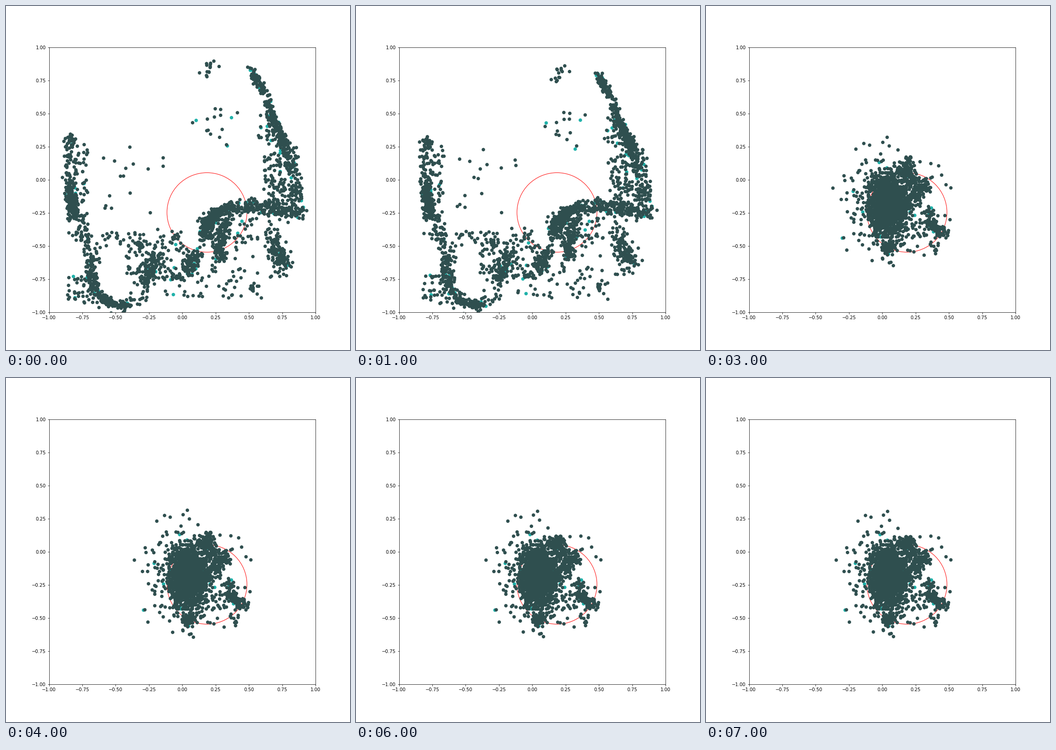
A matplotlib script that plays this animation: 748x748 px, repeating every 8 s.

```python
import numpy as np
import matplotlib.pyplot as plt
from matplotlib.animation import FuncAnimation

FRAMES, INTERVAL, DPI, SIZE = 8, 1000, 72, 748
DARK, TEAL, TEAL_SHARE = "darkslategray", "lightseagreen", .04
rng = np.random.default_rng(11)


def noise(n, spread):
    return spread * np.clip(rng.normal(size=(n, 2)), -2.2, 2.2)


def path(n, spread, *keys):
    """Points strewn along a polyline, evenly shared among its segments."""
    xs, ys = zip(*keys)
    t = rng.uniform(0, len(keys) - 1, n)
    steps = range(len(keys))
    line = np.column_stack([np.interp(t, steps, xs), np.interp(t, steps, ys)])
    return line + noise(n, spread)


def ring(n, spread, center, radii, start, end):
    """Points strewn along an elliptic arc, angles in degrees."""
    a = np.radians(rng.uniform(start, end, n))
    return center + radii * np.column_stack([np.cos(a), np.sin(a)]) \
        + noise(n, spread)


def blob(n, x, y, sx, sy):
    return (x, y) + noise(n, 1) * (sx, sy)


def box(n, x0, x1, y0, y1):
    return rng.uniform((x0, y0), (x1, y1), (n, 2))


def mix(*parts):
    pts = np.vstack(parts)
    rng.shuffle(pts)
    return pts


def wide_cloud():
    left = [
        blob(22, -.84, .31, .025, .025),
        path(35, .022, (-.86, .25), (-.85, 0)),
        path(190, .02, (-.845, -.02), (-.83, -.17), (-.81, -.28)),
        path(60, .025, (-.79, -.25), (-.73, -.4), (-.69, -.6)),
        box(45, -.85, -.7, -.2, .28),
        box(12, -.86, -.7, -.5, -.33),
        box(35, -.86, -.66, -.93, -.72),
    ]
    loop_center, loop_radii = (-.47, -.69), (.215, .26)
    loop = [
        ring(110, .03, loop_center, loop_radii, 0, 360),
        ring(95, .024, loop_center, loop_radii, 155, 215),
        ring(80, .014, loop_center, loop_radii, 215, 290),
        path(110, .035, (-.3, -.76), (-.22, -.67), (-.18, -.55)),
        box(45, -.42, -.2, -.75, -.4),
        box(75, -.2, .06, -.76, -.37),
        path(90, .024, (.03, -.7), (.12, -.54)),
    ]
    arch = [
        path(190, .026, (.16, -.43), (.18, -.32), (.25, -.26)),
        path(110, .017, (.22, -.28), (.29, -.23), (.38, -.19)),
        path(190, .032, (.4, -.2), (.55, -.21), (.7, -.22), (.88, -.25)),
        path(150, .025, (.34, -.24), (.28, -.48), (.28, -.61)),
        box(30, .2, .36, -.45, -.25),
    ]
    right = [
        path(120, .015, (.51, .86), (.57, .73), (.65, .6), (.66, .48)),
        path(150, .015, (.67, .47), (.72, .35), (.77, .27)),
        path(140, .028, (.78, .25), (.83, .12), (.86, -.1), (.88, -.31)),
        box(110, .61, .84, -.2, .2),
        box(30, .63, .74, .15, .45),
        path(100, .03, (.66, -.42), (.71, -.55), (.78, -.66)),
        box(35, .62, .82, -.75, -.3),
    ]
    sparse = [
        blob(14, .21, .82, .04, .035),
        box(16, .05, .45, .25, .55),
        box(16, -.6, -.1, -.25, .25),
        box(6, .5, .6, .3, .6),
        box(55, -.15, .6, -.9, -.65),
        box(30, .35, .57, -.6, -.25),
        blob(12, .53, -.82, .025, .012),
    ]
    return mix(*left, *loop, *arch, *right, *sparse)


def core_cloud():
    return mix(
        blob(1300, .035, -.19, .066, .11),
        blob(420, .03, -.17, .115, .145),
        path(170, .03, (.1, -.22), (.2, -.17), (.28, -.1), (.33, -.02)),
        path(160, .032, (.21, .17), (.15, .08), (.2, .03), (.29, -.05)),
        path(110, .02, (.34, -.22), (.36, -.33), (.42, -.39), (.48, -.41)),
        blob(80, .05, -.51, .026, .03),
        box(50, .1, .42, -.57, -.25),
        ring(34, .05, (.05, -.17), (.34, .42), 65, 285),
        ring(9, .03, (.05, -.17), (.45, .45), -65, 45),
    )


def shrink(p):
    """First small contraction of the wide cloud."""
    x, y = p.T
    pull = np.where(x > .2, .07 * np.clip((.98 - x) * 3, 0, 1), .045)
    dy = -.035 * (y + .2) * np.clip((y + 1) * 3, 0, 1)
    return p + np.column_stack([pull * (.2 - x), dy]) + jitter


def settle(p, u):
    """Ease the core into place: left side inwards, upper lobe downwards."""
    s = 1 - (1 - u) ** 2
    x, y = p.T
    dx = .08 * np.maximum(.1 - x, 0)
    lobe = np.exp(-((x - .2) / .12) ** 2)
    dy = .12 * np.maximum(-.55 - y, 0) - .6 * lobe * np.maximum(y - .05, 0)
    return p + s * np.column_stack([dx, dy])


wide, core = wide_cloud(), core_cloud()
jitter = noise(len(wide), .008)

fig, ax = plt.subplots(figsize=(SIZE / DPI + 1e-9,) * 2, dpi=DPI)
ax.set(xlim=(-1, 1), ylim=(-1, 1))
ax.add_patch(plt.Circle((.185, -.247), .3, fill=False, ec="red", lw=1))
dots = ax.scatter([], [], s=36, lw=1.5)


def draw(i):
    if i < 2:
        pts = shrink(wide) if i else wide
    else:
        pts = settle(core, (i - 2) / (FRAMES - 3))
    teal = int(TEAL_SHARE * len(pts))
    dots.set_offsets(pts)
    dots.set_color([TEAL] * teal + [DARK] * (len(pts) - teal))
    return (dots,)


anim = FuncAnimation(fig, draw, frames=FRAMES, interval=INTERVAL, repeat=True)
plt.show()
```
